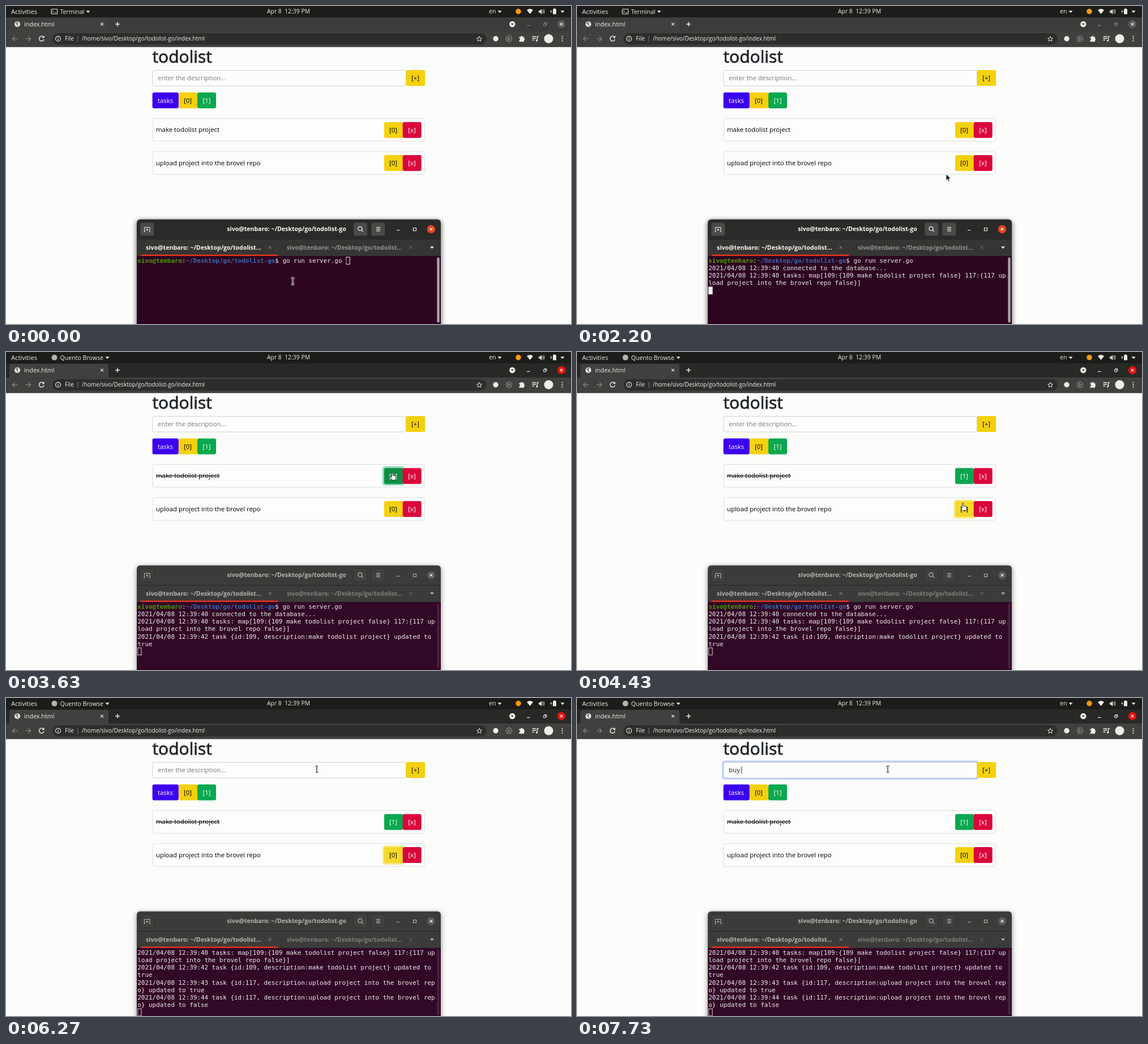
These frames come from a looping animation (998x561 px, 8000 ms). An HTML page:

```html
<!DOCTYPE html>
<html lang="en">
<head>
<meta charset="utf-8">
<title>todolist</title>
<style>
  html, body { margin: 0; width: 100%; height: 100%; overflow: hidden; background: #fcfcfb; }
  svg { display: block; width: 998px; height: 561px; }
  text { font: 11.4px "Open Sans", "Noto Sans", sans-serif; white-space: pre; }
  .mid { text-anchor: middle; }
  .bar { font-size: 10.6px; font-weight: 500; fill: #ecece8; }
  .url { font-size: 10px; fill: #eeeeea; }
  .h1 { font-size: 30px; fill: #212529; stroke: #212529; stroke-width: .8px; }
  .title { font-size: 10.6px; font-weight: 700; }
  .item { font-weight: 600; fill: #f2f2ee; }
  .mono text { font: 10.92px "DejaVu Sans Mono", monospace; fill: #eeeeec; }
  .mono .b { font-weight: 700; }
  .line { fill: none; stroke-width: 1.2; }
  .yel { fill: #f5d10c; } .grn { fill: #0aa84f; } .red { fill: #da063c; } .blu { fill: #3c02f0; }
  .w { fill: #fff; }

  /* Every timeline lasts 8 s: 1% is 80 ms */
  [class^="t-"], .shift { animation: 8s step-end infinite; }

  /* Window focus moves from the terminal to the browser */
  .shift { color: var(--a); animation: shift 8s linear infinite; }
  @keyframes shift { 0%, 38.75% { color: var(--a) } 41.25%, 100% { color: var(--b) } }
  .t-term { animation-name: term; }
  @keyframes term { 0% { visibility: visible } 39.125%, 100% { visibility: hidden } }
  .t-brow { animation-name: brow; }
  @keyframes brow { 0% { visibility: hidden } 39.125%, 100% { visibility: visible } }

  /* Terminal output */
  .t-out { animation-name: out; }
  @keyframes out { 0% { visibility: hidden } 19.125%, 100% { visibility: visible } }
  .t-log1 { animation-name: log1; }
  @keyframes log1 { 0% { visibility: hidden } 40.875%, 100% { visibility: visible } }
  .t-log2 { animation-name: log2; }
  @keyframes log2 { 0% { visibility: hidden } 56%, 100% { visibility: visible } }
  .t-log3 { animation-name: log3; }
  @keyframes log3 { 0% { visibility: hidden } 65.375%, 100% { visibility: visible } }
  .t-scroll { animation-name: scroll; }
  @keyframes scroll { 0% { transform: none } 65.375%, 100% { transform: translateY(-26.3px) } }
  .t-cursor { animation-name: cursor; }
  @keyframes cursor {
    0% { transform: translate(600.5px, 443px); fill: #0000; stroke: #eee }
    1.25% { fill: #fff; stroke: #fff }
    8.75% { fill: #0000; stroke: #0000 }
    12.125% { transform: translate(232.5px, 456.15px); fill: #fff; stroke: #fff }
    19.125% { transform: translate(232.5px, 495.6px) }
    19.625% { fill: #0000; stroke: #0000 }
    27.125% { fill: #fff; stroke: #fff }
    34.625% { fill: #0000; stroke: #0000 }
    38.75% { fill: #0000; stroke: #ddd }
    40.875% { transform: translate(232.5px, 521.9px) }
    56% { transform: translate(232.5px, 548.2px) }
    65.375%, 100% { transform: translate(232.5px, 574.5px); fill: #0000; stroke: #ddd }
  }

  /* Task toggles */
  .t-one0 { animation-name: one0; }
  @keyframes one0 { 0% { visibility: visible } 40.375%, 100% { visibility: hidden } }
  .t-one1 { animation-name: one1; }
  @keyframes one1 { 0% { visibility: hidden } 40.375%, 100% { visibility: visible } }
  .t-two0 { animation-name: two0; }
  @keyframes two0 { 0% { visibility: visible } 55.625% { visibility: hidden } 65%, 100% { visibility: visible } }
  .t-two1 { animation-name: two1; }
  @keyframes two1 { 0% { visibility: hidden } 55.625% { visibility: visible } 65%, 100% { visibility: hidden } }
  #btn1 { animation: btn1 8s linear infinite; }
  @keyframes btn1 {
    0%, 35% { fill: #f5d10c } 36.9%, 40.375% { fill: #f5d929 }
    42.25%, 53.75% { fill: #0a8f43 } 55.6%, 100% { fill: #0aa84f }
  }
  #ring1 { animation: ring1 8s linear infinite; }
  @keyframes ring1 {
    0%, 39.125% { fill: #f5d91400 } 40.375% { fill: #f5d91480 }
    42.25%, 53.75% { fill: #1fb86a80 } 55.6%, 100% { fill: #1fb86a00 }
  }
  #btn2 { animation: btn2 8s linear infinite; }
  @keyframes btn2 {
    0%, 49.4% { fill: #f5d10c } 51.25%, 55.625% { fill: #f5d929 }
    57.5%, 65% { fill: #0a8a42 } 66.9%, 80.375% { fill: #f5d929 } 82.25%, 100% { fill: #f5d10c }
  }
  #ring2 { animation: ring2 8s linear infinite; }
  @keyframes ring2 {
    0%, 53.75% { fill: #f5d91400 } 55.625% { fill: #f5d91480 } 57.5%, 65% { fill: #1fb86a80 }
    66.9%, 80.375% { fill: #f5d91480 } 82.25%, 100% { fill: #f5d91400 }
  }

  /* Input field */
  #halo { animation: halo 8s ease infinite; }
  @keyframes halo { 0%, 80.375% { opacity: 0 } 82.25%, 100% { opacity: 1 } }
  .t-hint { animation-name: hint; }
  @keyframes hint { 0% { visibility: visible } 91.5%, 100% { visibility: hidden } }
  .t-b { animation-name: kb; }
  @keyframes kb { 0% { visibility: hidden } 91.5%, 100% { visibility: visible } }
  .t-u { animation-name: ku; }
  @keyframes ku { 0% { visibility: hidden } 93.375%, 100% { visibility: visible } }
  .t-y { animation-name: ky; }
  @keyframes ky { 0% { visibility: hidden } 95%, 100% { visibility: visible } }
  .t-drop { animation-name: drop; }
  @keyframes drop { 0% { visibility: hidden } 91.5% { visibility: visible } 93.375%, 100% { visibility: hidden } }
  .t-caret { animation-name: caret; }
  @keyframes caret {
    0% { visibility: hidden; transform: none }
    81.625% { visibility: visible } 87.875% { visibility: hidden }
    91.5% { visibility: visible; transform: translateX(7px) }
    93.375% { transform: translateX(14px) }
    95% { transform: translateX(19.4px) }
    96.5%, 100% { visibility: visible; transform: translateX(22.4px) }
  }

  /* Pointer */
  #mouse { animation: mouse 8s ease-in-out infinite; }
  @keyframes mouse {
    0%, 22.125% { transform: translate(506.5px, 485.5px) }
    23.75%, 26.25% { transform: translate(585px, 368px) }
    27.5%, 30% { transform: translate(652px, 296.5px) }
    36.625%, 46.25% { transform: translate(682px, 213px) }
    50.875%, 72.125% { transform: translate(681.5px, 267px) }
    78.375%, 100% { transform: translate(549px, 125.5px) }
  }
  .t-beam { animation-name: beam; }
  @keyframes beam { 0% { visibility: visible } 23.25% { visibility: hidden } 77.5%, 100% { visibility: visible } }
  .t-arrow { animation-name: arrow; }
  @keyframes arrow {
    0% { visibility: hidden } 23.25% { visibility: visible } 35% { visibility: hidden }
    48% { visibility: visible } 49.4% { visibility: hidden }
    73% { visibility: visible } 77.5%, 100% { visibility: hidden }
  }
  .t-hand { animation-name: hand; }
  @keyframes hand {
    0% { visibility: hidden } 35% { visibility: visible } 48% { visibility: hidden }
    49.4% { visibility: visible } 73%, 100% { visibility: hidden }
  }
</style>
</head>
<body>
<svg viewBox="0 0 998 561" xmlns="http://www.w3.org/2000/svg">
  <defs>
    <clipPath id="screen"><rect x="231" y="441" width="537" height="120"/></clipPath>
    <filter id="blur" x="-10%" y="-10%" width="120%" height="130%"><feGaussianBlur stdDeviation="4"/></filter>
    <path id="down" d="M-3.5 -1.8H3.5L0 2.2Z"/>
    <path id="cross" d="M-2.4 -2.4L2.4 2.4M2.4 -2.4L-2.4 2.4"/>
    <rect id="btn" width="33" height="28" rx="3"/>
  </defs>

  <rect width="998" height="561" fill="#fcfcfb"/>

  <!-- Top panel -->
  <rect width="998" height="20" fill="#1c1c1a"/>
  <text class="bar" x="9" y="13.6" style="font-size:11.2px">Activities</text>
  <g class="t-term">
    <rect class="line" x="80" y="5.5" width="10.5" height="8.5" rx="1" stroke="#e4e4e0"/>
    <path class="line" d="M82 8l2 1.7-2 1.7M85.5 11.7h2.5" stroke="#e4e4e0" style="stroke-width:1"/>
    <text class="bar" x="95.5" y="13.6">Terminal</text>
    <use href="#down" x="145" y="10" fill="#e4e4e0"/>
  </g>
  <g class="t-brow">
    <circle cx="85.5" cy="9.8" r="5" fill="#b4b4ae"/>
    <text class="bar" x="95.5" y="13.6">Quento Browse</text>
    <use href="#down" x="179" y="10" fill="#e4e4e0"/>
  </g>
  <text class="bar mid" x="499" y="13.4" style="font-size:10.4px">Apr 8  12:39 PM</text>
  <text class="bar" x="853" y="13.4">en</text>
  <g fill="#ecece8">
    <use href="#down" x="872" y="10"/>
    <use href="#down" x="983" y="10"/>
    <circle cx="905" cy="9.6" r="4.8" fill="#f39a12"/>
    <path d="M920 7.2Q925.5 3 931 7.2L925.5 14Z"/>
    <path d="M941 8h2.2l3-2.8v9.2l-3-2.7h-2.2Z"/>
    <path class="line" d="M947.7 7q1.8 2.7 0 5.4M949.6 5.5q2.8 4.2 0 8.4" stroke="#ecece8" style="stroke-width:1"/>
    <rect x="966" y="5.5" width="6" height="9" rx="1"/><rect x="967.5" y="4.3" width="3" height="2"/>
    <path d="M963.3 6l-2 4h1.5l-.8 3.5 2.5-4.5h-1.5Z"/>
  </g>

  <!-- Browser frame -->
  <rect class="shift" style="--a:#3b3c3a;--b:#282927" y="20" width="998" height="26" fill="currentColor"/>
  <path d="M2 46q4 0 4-4V25q0-4 4-4H177q4 0 4 4V42q0 4 4 4Z" fill="#40413f"/>
  <rect y="45" width="998" height="27" fill="#40413f"/>
  <rect y="71.4" width="998" height="1" fill="#2c2d2b"/>
  <rect x="82" y="48" width="767" height="20" rx="10" fill="#2d2e2c"/>
  <circle cx="20" cy="32" r="5" fill="#ecece8"/>
  <path class="line" d="M16.5 30q2.5 0 3 2t2 3M19 27.5q0 2.5 3 2.5" stroke="#40413f"/>
  <text class="bar" x="32" y="35.7" style="font-size:10.8px">index.html</text>
  <g class="line" stroke="#e8e8e4">
    <use href="#cross" x="169.5" y="32"/>
    <path d="M193 32h8M197 28v8" style="stroke-width:1.5"/>
    <path d="M20.5 57.7H11.5M15.5 53.5L11.3 57.7L15.5 62M34.5 57.7H43.5M39.5 53.5L43.7 57.7L39.5 62" stroke="#858581"/>
    <path d="M66.3 55A4.3 4.3 0 1 0 67 59" style="stroke-width:1.5"/>
    <circle cx="92" cy="57.7" r="4.4"/><path d="M92 57v3M92 55v1"/>
    <path d="M836 53.5l1.3 3 3.2.3-2.4 2.1.7 3.2-2.8-1.7-2.8 1.7.7-3.2-2.4-2.1 3.2-.3Z" style="stroke-width:1"/>
    <circle cx="888.5" cy="57.7" r="5" stroke="#8b8b87"/><path d="M887 55.5l3.5 2.2-3.5 2.2Z" stroke="#8b8b87"/>
    <path d="M929.5 54h7M929.5 57h7M929.5 60h3.5M938.5 61v-7h2.5" style="stroke-width:1.4"/>
  </g>
  <path d="M67.6 52.3v4.2h-4.2Z" fill="#e8e8e4"/>
  <text class="url" x="104" y="61.3">File</text>
  <rect x="126.5" y="52.5" width="1" height="11" fill="#7a7a76"/>
  <text class="url" x="134" y="61.3">/home/sivo/Desktop/go/todolist-go/index.html</text>
  <g fill="#ecece8">
    <circle cx="865" cy="57.7" r="4.7"/>
    <path d="M906.5 54.5h2.5a1.8 1.8 0 0 1 3.6 0h2.4v2.6a1.8 1.8 0 0 1 0 3.4v2.5h-8.5v-2.7a1.6 1.6 0 0 0 0-3.2Z"/>
    <circle cx="937.5" cy="61" r="1.6"/>
    <circle cx="958.5" cy="57.7" r="8"/>
    <circle cx="982.5" cy="53.8" r="1.1"/><circle cx="982.5" cy="57.7" r="1.1"/><circle cx="982.5" cy="61.6" r="1.1"/>
    <circle cx="894.3" cy="32" r="5.2"/><use href="#down" transform="translate(894.3 32.2) scale(.75)" fill="#333432"/>
  </g>
  <g class="line shift" style="--a:#858581;--b:#ecece8" stroke="currentColor">
    <path d="M920 34.5h5.5"/><path d="M949.5 31h3.8v3.8h-3.8ZM951 31v-1.5h3.8v3.8h-1.5" style="stroke-width:1"/>
  </g>
  <circle class="shift" style="--a:#5a5b58;--b:#df140f" cx="981" cy="32" r="7.2" fill="currentColor"/>
  <use class="line" href="#cross" x="981" y="32" stroke="#f4f4f0"/>

  <!-- Page -->
  <text class="h1" x="258.5" y="100.3">todolist</text>
  <rect id="halo" x="256" y="110.5" width="453.5" height="33.5" rx="5" fill="#bccffb"/>
  <rect x="259" y="113.5" width="447.5" height="27.5" rx="3" fill="#fdfdfd" stroke="#cdd0d3"/>
  <text class="t-hint" x="268" y="131" fill="#73787d">enter the description...</text>
  <text x="268" y="131" fill="#212529"><tspan class="t-b">b</tspan><tspan class="t-u">u</tspan><tspan class="t-y">y</tspan></text>
  <rect class="t-caret" x="267.7" y="121" width="1" height="12.5" fill="#111"/>
  <rect class="yel" x="706.5" y="113" width="33.7" height="28" rx="3"/><text class="mid" x="723" y="130.8">[+]</text>
  <rect class="blu" x="258.6" y="152.6" width="46.2" height="28" rx="3"/><text class="mid w" x="281.5" y="170.5">tasks</text>
  <use href="#btn" class="yel" x="305" y="152.6"/><text class="mid" x="321" y="170.5">[0]</text>
  <use href="#btn" class="grn" x="338" y="152.6"/><text class="mid w" x="354.5" y="170.5">[1]</text>

  <g fill="#fdfdfd" stroke="#dededb">
    <rect x="259" y="198.5" width="480.5" height="40" rx="3"/>
    <rect x="259" y="257" width="480.5" height="40" rx="3"/>
  </g>
  <text x="265" y="222.4">make todolist project</text>
  <text x="265" y="280.9">upload project into the brovel repo</text>
  <rect class="t-one1" x="265" y="218.3" width="113" height="1"/>
  <rect class="t-two1" x="265" y="276.8" width="186.5" height="1"/>

  <rect id="ring1" x="665" y="201.8" width="38.8" height="33.8" rx="5"/>
  <use id="btn1" href="#btn" x="668" y="204.7"/>
  <text class="t-one0" x="677" y="222.6">[0]</text>
  <g class="t-one1"><text class="w" x="677" y="222.6">[1]</text></g>
  <rect id="ring2" x="665" y="260.2" width="38.8" height="33.8" rx="5"/>
  <use id="btn2" href="#btn" x="668" y="263.1"/>
  <text class="t-two0" x="677" y="281.1">[0]</text>
  <g class="t-two1"><text class="w" x="677" y="281.1">[1]</text></g>
  <use href="#btn" class="red" x="700.7" y="204.7"/><text class="mid w" x="717" y="222.6">[x]</text>
  <use href="#btn" class="red" x="700.7" y="263.1"/><text class="mid w" x="717" y="281.1">[x]</text>

  <!-- Suggestions -->
  <g class="t-drop">
    <rect x="257.5" y="142" width="141" height="170" rx="3" fill="#00000030"/>
    <rect x="258" y="142" width="140" height="169" rx="2" fill="#3c3d3b"/>
    <text class="item" x="267" y="164.7">test</text>
    <text class="item" x="267" y="191">qwer</text>
    <text class="item" x="267" y="217.3">qqq</text>
    <text class="item" x="267" y="243.6">hellooooo</text>
    <text class="item" x="267" y="269.9">qwefwefw</text>
    <text class="item" x="267" y="296.2">12312</text>
  </g>

  <!-- Terminal window -->
  <rect class="shift" style="--a:#00000090;--b:#00000060" x="230" y="378" width="539" height="200" rx="7" fill="currentColor" filter="url(#blur)"/>
  <path class="shift" style="--a:#2a2b29;--b:#3b3c3a" d="M231 442V383q0-6.5 6.5-6.5H761.5q6.5 0 6.5 6.5V442Z" fill="currentColor"/>
  <rect class="shift" style="--a:#353634;--b:#3b3c3a" x="231" y="411" width="537" height="30" fill="currentColor"/>
  <rect x="231" y="411" width="537" height="1" fill="#262725"/>
  <g class="shift" style="--a:#4a4b49;--b:#40413f" fill="currentColor" stroke="#30312f">
    <rect x="237" y="382" width="24.5" height="23.5" rx="3"/>
    <rect x="614" y="382" width="24.5" height="23.5" rx="3"/>
    <rect x="645" y="382" width="24.5" height="23.5" rx="3"/>
  </g>
  <g class="line shift" style="--a:#f0f0ec;--b:#b4b4b0" stroke="currentColor">
    <path d="M244.5 398V390.5h9.5V398M247 394.5h4.5M249.3 392.3v4.5M243.5 398h2.5M252.5 398h2.5" style="stroke-width:1"/>
    <circle cx="625.5" cy="392.8" r="3.5"/><path d="M628 395.3l3 3"/>
    <path d="M654 390.7h7M654 393.7h7M654 396.7h7"/>
    <path d="M690 395.5h5.5M719.5 391.5h5v5h-5Z"/>
  </g>
  <text class="title mid shift" style="--a:#fafaf6;--b:#b2b2ae" x="495.5" y="397.3" fill="currentColor">sivo@tenbaro: ~/Desktop/go/todolist-go</text>
  <circle class="shift" style="--a:#e2431e;--b:#575855" cx="751" cy="393.8" r="7.3" fill="currentColor"/>
  <use class="line" href="#cross" x="751" y="393.8" stroke="#fff"/>
  <text class="title shift" style="--a:#f4f4f0;--b:#b2b2ae" x="247" y="429.6" fill="currentColor">sivo@tenbaro: ~/Desktop/go/todolist...</text>
  <text class="title shift" style="--a:#90918d;--b:#7d7e7a" x="496" y="429.6" fill="currentColor">sivo@tenbaro: ~/Desktop/go/todolist...</text>
  <use class="line" href="#cross" x="466" y="426" stroke="#777874"/>
  <use class="line" href="#cross" x="715" y="426" stroke="#5f605c"/>
  <use href="#down" x="752.5" y="426" class="shift" style="--a:#f0f0ec;--b:#b4b4b0" fill="currentColor"/>
  <rect class="shift" style="--a:#2d0521;--b:#320827" x="231" y="441" width="537" height="120" fill="currentColor"/>
  <rect x="238" y="438.5" width="242" height="2.5" fill="#e5331f"/>

  <g clip-path="url(#screen)" class="mono">
    <g class="t-scroll">
      <text x="232.3" y="453"><tspan class="b" fill="#4e9a06">sivo@tenbaro</tspan>:<tspan class="b" fill="#3d68ac">~/Desktop/go/todolist-go</tspan>$ go run server.go</text>
      <g class="t-out">
        <text x="232.3" y="466.15">2021/04/08 12:39:40 connected to the database...</text>
        <text x="232.3" y="479.3">2021/04/08 12:39:40 tasks: map[109:{109 make todolist project false} 117:{117 up</text>
        <text x="232.3" y="492.45">load project into the brovel repo false}]</text>
      </g>
      <g class="t-log1">
        <text x="232.3" y="505.6">2021/04/08 12:39:42 task {id:109, description:make todolist project} updated to</text>
        <text x="232.3" y="518.75">true</text>
      </g>
      <g class="t-log2">
        <text x="232.3" y="531.9">2021/04/08 12:39:43 task {id:117, description:upload project into the brovel rep</text>
        <text x="232.3" y="545.05">o} updated to true</text>
      </g>
      <g class="t-log3">
        <text x="232.3" y="558.2">2021/04/08 12:39:44 task {id:117, description:upload project into the brovel rep</text>
        <text x="232.3" y="571.35">o} updated to false</text>
      </g>
      <rect class="t-cursor" width="6.6" height="12.5"/>
    </g>
  </g>
  <rect class="shift" style="--a:#a9a3a7;--b:#46213c" x="761.3" y="443.5" width="4.5" height="115" rx="2.2" fill="currentColor"/>

  <!-- Pointer shapes share one hotspot -->
  <g id="mouse">
    <g class="t-beam" fill="none">
      <path d="M-2.5 -5.5H2.5M0 -5.5V5.5M-2.5 5.5H2.5" stroke="#fff" stroke-width="2.8"/>
      <path d="M-2.5 -5.5H2.5M0 -5.5V5.5M-2.5 5.5H2.5" stroke="#222" stroke-width="1.2"/>
    </g>
    <path class="t-arrow" d="M0 0V11.5L2.7 9L4.6 13.2L6.4 12.4L4.6 8.3L8.3 8Z" fill="#151515" stroke="#fff" stroke-width=".8"/>
    <path class="t-hand" d="M-1 0Q.2 -1 1.2 0V4.5L5.5 5.3Q7 5.7 6.8 7.5L6 13H0L-3.3 8.5Q-3.5 7 -2 7.2L-1 8Z" fill="#fff" stroke="#1a1a1a" stroke-width=".9"/>
  </g>
</svg>
</body>
</html>
```
